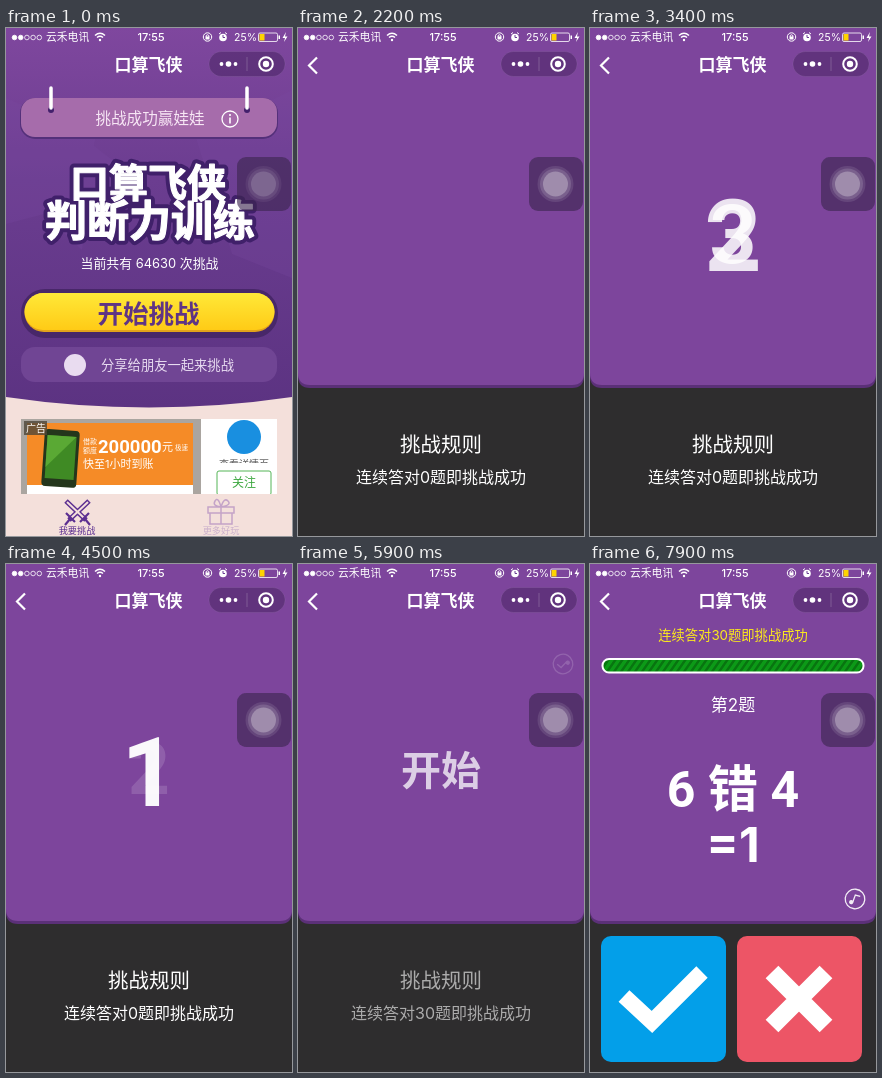
These frames come from a looping animation (286 by 508 pixels, 8 s). An HTML page:

```html
<!DOCTYPE html>
<html lang="zh-CN">
<head>
<meta charset="utf-8">
<style>
  html, body { margin: 0; width: 100%; height: 100%; overflow: hidden; background: #2e2d2e; }
  svg { display: block; width: 100vw; height: 100vh; }
  text { font-family: Inter, "Noto Sans CJK SC", "Noto Sans CJK", sans-serif; fill: #fff; }
  .mid { text-anchor: middle; }
  .num { font-family: Roboto, "Noto Sans CJK SC", "Noto Sans CJK", sans-serif; font-weight: 700; }
  .fat { font-weight: 900; stroke: #fff; stroke-width: 1.2; stroke-linejoin: round; }
  .rim { font-weight: 900; stroke: #40206a; stroke-width: 9; stroke-linejoin: round; }
  .line { fill: none; stroke: #fff; }
</style>
</head>
<body>
<svg viewBox="0 0 286 508" preserveAspectRatio="none">
  <defs>
    <pattern id="stripes" width="7" height="13" patternUnits="userSpaceOnUse" patternTransform="skewX(-35)">
      <rect width="7" height="13" fill="#0c9a17"/>
      <rect width="3" height="13" fill="#087510"/>
    </pattern>
    <linearGradient id="gold" x2="0" y2="1">
      <stop offset="0" stop-color="#ffe838"/>
      <stop offset="1" stop-color="#ffcb16"/>
    </linearGradient>
    <linearGradient id="dusk" x2="0" y2="1">
      <stop offset="0" stop-color="#7f479e"/>
      <stop offset=".4" stop-color="#6b3d90"/>
      <stop offset="1" stop-color="#5c3382"/>
    </linearGradient>
    <clipPath id="ad"><rect x="15" y="391" width="256" height="75"/></clipPath>
  </defs>

  <g id="home">
    <rect width="286" height="508" fill="#f4e0db"/>
    <path d="M0 0H286V369Q143 390 0 369Z" fill="url(#dusk)"/>
    <path d="M0 70L52 92 96 72 88 118 130 150 84 172 76 222 38 186 0 196Z M190 110L286 62V250L226 226Z" fill="#7a4a9e" opacity=".25"/>
    <rect x="14" y="70" width="258" height="41" rx="15" fill="#54307a"/>
    <rect x="15" y="70" width="256" height="39" rx="14" fill="#a66cab"/>
    <g id="hooks"></g>
    <text class="mid" x="144" y="96" font-size="15.600" style="fill:#f7e6f5">挑战成功赢娃娃</text>
    <circle class="line" cx="224" cy="91" r="8" stroke-width="1.3"/>
    <path class="line" d="M224 86v2M224 89.500v6" stroke-width="1.6"/>
    <g id="logo"></g>
    <text class="mid" x="143.500" y="240" font-size="12.900">当前共有 64630 次挑战</text>
    <rect x="15" y="261" width="257" height="49" rx="24" fill="#482769"/>
    <rect x="18.500" y="265" width="250" height="39" rx="19.500" fill="#e3a31a"/>
    <rect x="18.500" y="265" width="250" height="37" rx="18.500" fill="url(#gold)"/>
    <text class="mid" x="142.500" y="295" font-size="25.500" font-weight="900" style="fill:#5f3485">开始挑战</text>
    <rect x="15" y="319" width="256" height="35" rx="14" fill="#704594"/>
    <circle cx="69" cy="337" r="11" fill="#e9dcf0"/>
    <text x="95" y="342" font-size="13.300" style="fill:#e8dcf1">分享给朋友一起来挑战</text>

    <g clip-path="url(#ad)">
      <rect x="15" y="391" width="256" height="75" fill="#aaa5a0"/>
      <rect x="21" y="395" width="166" height="71" fill="#fff"/>
      <rect x="21" y="395" width="166" height="62" fill="#f58b27"/>
      <g transform="rotate(4 55 431)">
        <rect x="37" y="402" width="35" height="57" rx="4" fill="#24361c"/>
        <rect x="40" y="408" width="29" height="43" fill="#3f8a24"/>
        <path d="M40 408H69L40 440Z" fill="#5aa934"/>
      </g>
      <rect x="18" y="393" width="23" height="14" fill="#4e4639" opacity=".8"/>
      <text x="20" y="404" font-size="10">广告</text>
      <text x="77" y="416" font-size="7">借款</text>
      <text x="77" y="425" font-size="7">额度</text>
      <text class="num" x="92" y="425" font-size="18.500">200000</text>
      <text x="156" y="423" font-size="11">元</text>
      <text x="169" y="422" font-size="6.500">极速</text>
      <text x="77" y="440" font-size="11">快至1小时到账</text>
      <rect x="195" y="391" width="76" height="75" fill="#fff"/>
      <circle cx="238" cy="409" r="17" fill="#198fe0"/>
      <text class="mid" x="238" y="440" font-size="10" style="fill:#555">查看详情页</text>
      <rect x="195" y="435" width="76" height="8" fill="#fff"/>
      <rect x="211" y="443" width="54" height="24" rx="2" fill="#fff" stroke="#55b557"/>
      <text class="mid" x="238" y="459" font-size="12" style="fill:#3aa63d">关注</text>
    </g>

    <g class="line" style="stroke:#5c2f91">
      <path d="M60 473L80 492M83 473L63 492" stroke-width="5"/>
      <path d="M61 474L78 490M82 474L65 490" stroke-width="2" style="stroke:#f4e0db"/>
      <path d="M60 485l9 9M74 494l9-9M64 491l-5 6M79 491l5 6" stroke-width="2.200"/>
    </g>
    <text class="mid" x="71" y="506" font-size="9.200" style="fill:#5c2f91">我要挑战</text>
    <path class="line" d="M202 479h26v6h-26zM204 485v11h22v-11M215 479v17M215 479q-9-1-6-6t6 6q3-10 7-6t-7 6" style="stroke:#c4a3c8" stroke-width="1.500"/>
    <text class="mid" x="215" y="506" font-size="9.200" style="fill:#cbb0cb">更多好玩</text>
  </g>

  <g id="play">
    <rect width="286" height="508" fill="#2e2d2e"/>
    <path d="M0 0H286V348Q286 360 274 360H12Q0 360 0 348Z" fill="#5b3078"/>
    <path d="M0 0H286V345Q286 357 274 357H12Q0 357 0 345Z" fill="#7d459c"/>
    <path class="line" d="M19 29.500L11 37.500 19 45.500" stroke-width="2.200"/>
    <g id="rules">
      <text class="mid" x="143" y="424" font-size="20.500">挑战规则</text>
      <text class="mid" id="goal" x="143" y="455" font-size="16"></text>
    </g>
    <text class="mid num" id="d3" y="34" font-size="96">3</text>
    <text class="mid num" id="d2" y="34" font-size="96">2</text>
    <text class="mid num" id="d1" y="34" font-size="96">1</text>
    <text class="mid" id="go" y="13" font-size="40" font-weight="700">开始</text>

    <g id="game">
      <text class="mid" x="143" y="76" font-size="13.300" style="fill:#fcea1c">连续答对30题即挑战成功</text>
      <rect x="12.500" y="95" width="261" height="13.500" rx="6.500" fill="url(#stripes)" stroke="#fff" stroke-width="2"/>
      <text class="mid" id="count" x="143" y="147" font-size="17"></text>
      <text class="mid num" id="sum" x="143" y="243" font-size="50"></text>
      <text class="mid" id="result" x="143" y="298" font-size="48" font-weight="700"></text>
      <rect x="11" y="372" width="125" height="126" rx="10" fill="#039fe9"/>
      <path class="line" d="M34 432L62 458 112 408" stroke-width="16"/>
      <g id="wrong">
        <rect x="147" y="372" width="125" height="126" rx="10" fill="#ed5566"/>
        <path class="line" d="M182 408L236 462M236 408L182 462" stroke-width="18"/>
      </g>
    </g>
    <g id="music" class="line" stroke-width="1.300">
      <circle r="9.800"/>
      <path d="M-2 3.500L0-4 5-3"/>
      <circle cx="-3.500" cy="3.500" r="1.500" fill="#fff"/>
    </g>
  </g>

  <g id="chrome">
    <g id="signal"></g>
    <text x="40" y="13" font-size="10.800">云禾电讯</text>
    <path class="line" d="M89 7.500Q94 3 99 7.500M91 9.500Q94 7 97 9.500" stroke-width="1.500"/>
    <circle cx="94" cy="12" r="1.200" fill="#fff"/>
    <text class="mid" x="145" y="13" font-size="11" font-weight="500">17:55</text>
    <circle class="line" cx="201.500" cy="9" r="4.200"/>
    <rect x="199.500" y="8.500" width="4" height="3" fill="#fff"/>
    <path class="line" d="M200.200 9V7.500q1.300-1.500 2.600 0V9"/>
    <circle cx="217" cy="9.500" r="3.800" fill="#fff"/>
    <path class="line" d="M213 6l2-1.500M221 6l-2-1.500"/>
    <path class="line" d="M217 7v2.500h2" style="stroke:#6a3d94"/>
    <text x="228" y="13" font-size="10.500">25%</text>
    <rect class="line" x="252.500" y="5" width="19" height="8.500" rx="1.500" stroke-width=".8"/>
    <rect x="253.500" y="6" width="5" height="6.500" fill="#ffd400"/>
    <rect x="272.500" y="7.500" width="1.500" height="3.500" fill="#fff"/>
    <path d="M280 4L276.500 10H279L278 14 281.500 8.500H279Z" fill="#fff"/>
    <text class="mid" x="142.500" y="43" font-size="17" font-weight="700">口算飞侠</text>
    <rect x="203" y="23.500" width="76" height="25" rx="12.500" fill="#2b1040" fill-opacity=".34" stroke="#fff" stroke-opacity=".1" stroke-width=".7"/>
    <path d="M241 29v14" stroke="#fff" stroke-opacity=".2"/>
    <g fill="#fff">
      <circle cx="215.500" cy="36" r="1.900"/><circle cx="222.500" cy="36" r="2.800"/><circle cx="229.500" cy="36" r="1.900"/>
      <circle cx="260" cy="36" r="3.200"/>
    </g>
    <circle class="line" cx="260" cy="36" r="6.800" stroke-width="2"/>
    <rect x="231" y="129" width="54" height="54" rx="9" fill="#3c2650" opacity=".62"/>
    <g id="touch" fill="#fff">
      <circle cx="257.500" cy="156" r="18" opacity=".1"/>
      <circle cx="257.500" cy="156" r="15.500" opacity=".14"/>
      <circle cx="257.500" cy="156" r="12.500" opacity=".28"/>
    </g>
  </g>
</svg>
<script>
const LOOP = 8000, STEP = 100;
const $ = id => document.getElementById(id);
const clamp = v => Math.min(1, Math.max(0, v));
const ramp = (t, from, to) => clamp((t - from) / (to - from));
const fade = (id, v) => $(id).setAttribute('opacity', v);
const move = (id, value) => $(id).setAttribute('transform', value);

$('hooks').innerHTML = [45, 241].map(x =>
  `<circle cx="${x}" cy="82" r="3" fill="#43206c"/>
   <path class="line" d="M${x} 60V80" stroke-width="3.5" stroke-linecap="round"/>`).join('');
$('signal').innerHTML = [0, 1, 2, 3, 4].map(i =>
  `<circle cx="${8.5 + i * 6.2}" cy="9.5" r="2.3" stroke="#fff" stroke-width=".8" fill="${i < 2 ? '#fff' : 'none'}"/>`).join('');
$('logo').innerHTML = ['rim', 'fat'].map(style =>
  `<text class="${style} mid" x="142" y="169" font-size="39">口算飞侠</text>
   <text class="${style} mid" x="144" y="208" font-size="42">判断力训练</text>`).join('');

// Each sign zooms in from `enter`, then shrinks away from `leave`.
const signs = [
  { id: 'd3', enter: 1600, leave: 3100, zoom: 3.4 },
  { id: 'd2', enter: 2700, leave: 4000, zoom: 3.4 },
  { id: 'd1', enter: 3600, leave: 5100, zoom: 3.4 },
  { id: 'go', enter: 4700, leave: LOOP, zoom: 3 }
];

function drawSign({ id, enter, leave, zoom }, t) {
  const p = ramp(t, enter, enter + 800);
  const out = ramp(t, leave, leave + 520);
  const scale = 1 + (zoom - 1) * (1 - p) ** 2 - .25 * out;
  let alpha = t < enter ? 0 : (.08 + .88 * p) * (1 - out ** 4);
  if (id === 'd3' && t < 2300) alpha = 0;
  if (id === 'go') alpha *= 1 - ramp(t, 5700, 6200) ** 1.6;
  fade(id, alpha);
  move(id, `translate(143 ${208 - 4 * out}) scale(${scale})`);
}

function draw(t) {
  const home = t < 2200;
  $('home').style.display = home ? '' : 'none';
  $('play').style.display = home ? 'none' : '';
  fade('touch', home ? .6 : 1);
  signs.forEach(s => drawSign(s, t));

  $('goal').textContent = `连续答对${t < 4700 ? 0 : 30}题即挑战成功`;
  fade('rules', 1 - ramp(t, 5600, 6200) * .8 - ramp(t, 6100, 6200) * .2);
  fade('game', ramp(t, 6200, 6600));

  const next = t >= 7900;
  $('count').textContent = next ? '第2题' : '第1题';
  $('sum').textContent = next ? '6 错 4' : '3 错 6';
  $('result').textContent = next ? '=1' : '=11';
  const push = next ? 0 : ramp(t, 7100, 7300);
  move('wrong', `translate(${3 * push} ${5 * push})`);

  const turn = next ? 5 : -190 + ramp(t, 5600, 7000) * 180 + ramp(t, 7100, 7300) * 15;
  fade('music', t < 6200 ? ramp(t, 5700, 6200) * .4 : .9);
  move('music', `translate(265 ${t < 6200 ? 100 : 335}) rotate(${turn})`);
}

const start = performance.now();
function tick() {
  const t = (performance.now() - start) % LOOP;
  draw(Math.floor(t / STEP) * STEP);
  requestAnimationFrame(tick);
}
tick();
</script>
</body>
</html>
```
